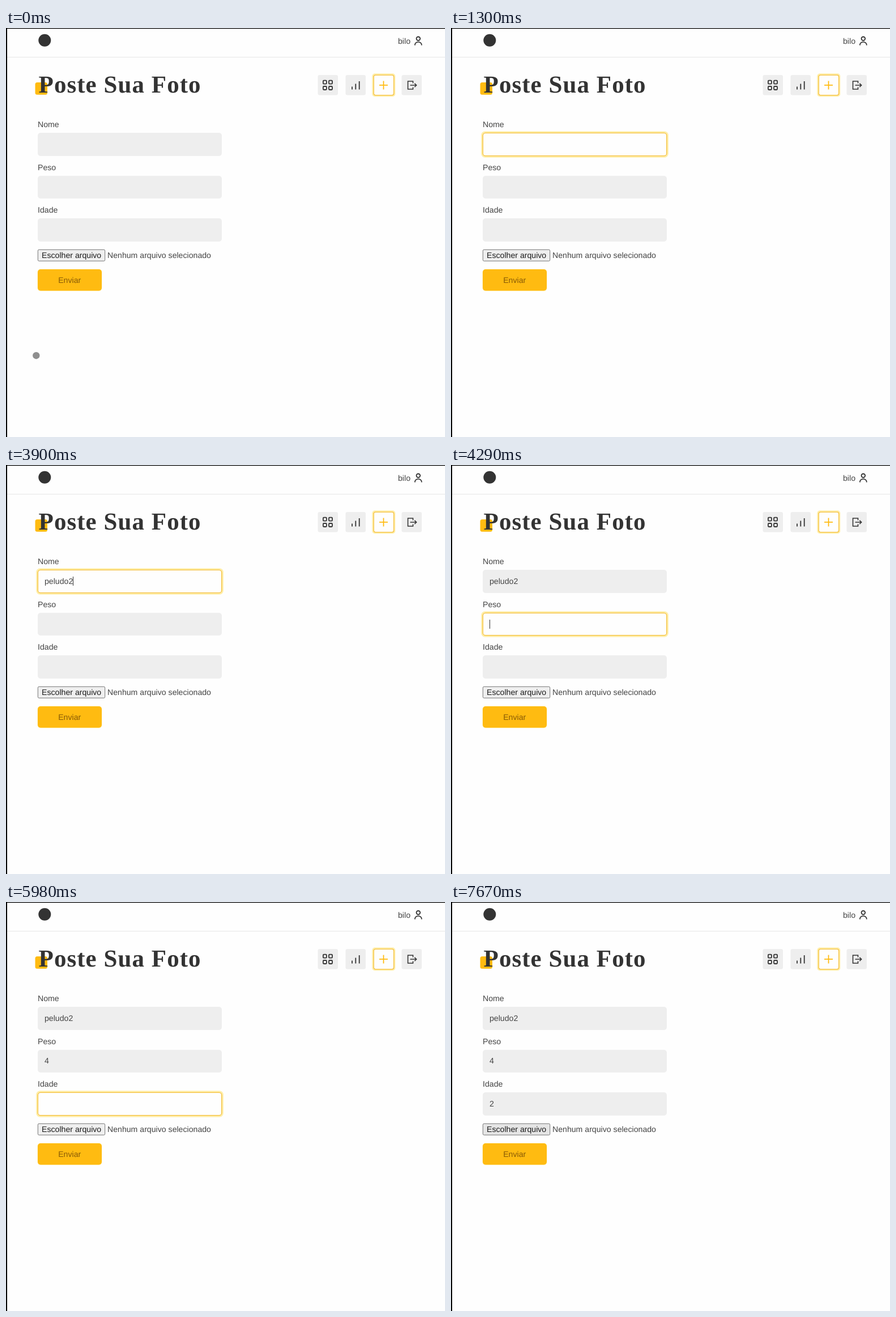
An HTML page for the animation above (8 s loop, 775 by 722 pixels).

```html
<!DOCTYPE html>
<html lang="pt">
<head>
<meta charset="utf-8">
<title>Poste Sua Foto</title>
<style>
  html, body { margin: 0; width: 100%; height: 100%; overflow: hidden; background: #fefefe; }
  svg { display: block; width: 775px; height: 722px; }
  text { font: 14.14px "Liberation Sans", Arial, sans-serif; fill: #444; text-rendering: geometricPrecision; white-space: pre; }
  .title { font: bold 43px "Liberation Serif", "Times New Roman", serif; letter-spacing: 1.05px; fill: #333; }
  .box { fill: #eee; }
  .halo { fill: #fea; }
  .edge { fill: #fefefe; stroke: #f4bf3c; stroke-width: 1.3; }
  .icon { fill: none; stroke: #333; stroke-width: 1.8; }
  .gold { fill: #fb1; }
</style>
</head>
<body>
<svg viewBox="0 0 775 722">
  <rect width="775" height="722" fill="#fefefe"/>
  <path d="M2 51.5H775" stroke="#e6e6e6"/>
  <path d="M0 0H775V1.3H2V722H0Z"/>

  <circle cx="68.3" cy="21.8" r="11" fill="#333"/>
  <text x="692" y="27.7">bilo</text>
  <g class="icon">
    <circle cx="727.8" cy="18.8" r="3.3"/>
    <path d="M721.9 30.6V29.6A5.9 5 0 0 1 733.7 29.6V30.6"/>
  </g>

  <rect class="gold" x="51.5" y="96" width="21.5" height="21.7" rx="3.5"/>
  <text class="title" x="57.6" y="114">Poste Sua Foto</text>

  <g class="box">
    <rect x="550.5" y="83" width="35.5" height="35.5" rx="3"/>
    <rect x="599.5" y="83" width="35.5" height="35.5" rx="3"/>
    <rect x="698.5" y="83" width="35.5" height="35.5" rx="3"/>
  </g>
  <rect class="halo" x="646.3" y="80.3" width="41" height="41" rx="5"/>
  <rect class="edge" x="649.2" y="83.2" width="35.4" height="35.4" rx="3"/>
  <g class="icon">
    <rect x="559.9" y="92.7" width="6" height="6" rx="1.2"/>
    <rect x="570" y="92.7" width="6" height="6" rx="1.2"/>
    <rect x="559.9" y="103" width="6" height="6" rx="1.2"/>
    <rect x="570" y="103" width="6" height="6" rx="1.2"/>
    <path d="M611 103.5V108.5M617.3 98.5V108.5M623.7 94V108.5"/>
    <path d="M666.5 93.5V108.5M659 100.8H674" stroke="#fb1"/>
    <path d="M718.5 97.5V94H709.5V108H718.5V104.5M713.5 101H724.5M721.3 97.7L724.6 101L721.3 104.3" stroke-width="1.6"/>
  </g>

  <g id="fields"></g>

  <rect id="file" x="56.3" y="391.3" width="118.4" height="20" rx="2" fill="#efefef" stroke="#767676"/>
  <text x="63" y="405.7" style="fill:#1c1c1c">Escolher arquivo</text>
  <text x="179" y="405.7">Nenhum arquivo selecionado</text>

  <rect x="55.5" y="425.5" width="114" height="39" rx="5.5" fill="#fe9" opacity=".6"/>
  <rect class="gold" x="56" y="426" width="113" height="37.7" rx="5"/>
  <text x="92.2" y="449.8" style="fill:#875a06">Enviar</text>

  <circle id="dot" cx="53.3" cy="578.2" r="6.2" fill="#8f8f8f"/>
  <path id="caret" d="M0 197V213" stroke="#333"/>
</svg>
<script>
const LOOP = 8000;
const $ = id => document.getElementById(id);

// Label, top and height of each input.
const inputs = [['Nome', 185, 41], ['Peso', 261, 40], ['Idade', 336, 41]];

// Each track is a list of [start ms, value], held until the next start.
const rise = t => [[t, .35], [t + 130, .88], [t + 260, 1]];
const fall = t => [[t, .65], [t + 130, .12], [t + 260, 0]];
const glow = [
  [[0, 0], ...rise(780), ...fall(4030)],
  [[0, 0], ...rise(4030), ...fall(5460)],
  [[0, 0], ...rise(5460), ...fall(7410)]
];
const name = 'peludo2';
const typed = [
  [[0, 0], [1690, 1], [1820, 2], [2080, 4], [2340, 5], [2470, 6], [3900, 7]]
    .map(([t, n]) => [t, name.slice(0, n)]),
  [[0, ''], [4810, '4']],
  [[0, ''], [6500, '2']]
];
// Index of the input with a visible caret, -1 when blinked off.
const caretAt = [
  [0, -1], [780, 0], [1300, -1], [1690, 0], [2860, -1], [3380, 0],
  [4030, 1], [4550, -1], [4810, 1], [5330, -1],
  [5460, 2], [5980, -1], [6500, 2], [7020, -1]
];
const dotShown = [[0, 1], [130, 0]];
const fileFill = [[0, '#efefef'], [7410, '#e5e5e5']];

const at = (track, t) => track.findLast(step => step[0] <= t)[1];

$('fields').innerHTML = inputs.map(([label, y, h]) => `
  <text x="56" y="${y - 9.9}">${label}</text>
  <rect class="box" x="56" y="${y}" width="325" height="${h}" rx="5"/>
  <g class="focus">
    <rect class="halo" x="53.2" y="${y - 2.8}" width="330.6" height="${h + 5.6}" rx="7"/>
    <rect class="edge" x="56.3" y="${y + .3}" width="324.4" height="${h - .6}" rx="4.5"/>
  </g>
  <text class="value" x="68" y="${y + 24.8 - (h < 41)}"></text>`).join('');
const focusEls = document.querySelectorAll('.focus');
const valueEls = document.querySelectorAll('.value');

function draw(t) {
  inputs.forEach((_, i) => {
    focusEls[i].setAttribute('opacity', at(glow[i], t));
    const value = at(typed[i], t);
    if (valueEls[i].textContent !== value) valueEls[i].textContent = value;
  });
  const i = at(caretAt, t);
  $('caret').setAttribute('opacity', i < 0 ? 0 : 1);
  if (i >= 0) {
    const x = Math.floor(68 + valueEls[i].getComputedTextLength()) + .5;
    $('caret').setAttribute('transform', `translate(${x} ${inputs[i][1] - 185})`);
  }
  $('dot').setAttribute('opacity', at(dotShown, t));
  $('file').setAttribute('fill', at(fileFill, t));
}

const start = performance.now();
function tick() {
  draw((performance.now() - start) % LOOP);
  requestAnimationFrame(tick);
}
tick();
</script>
</body>
</html>
```
